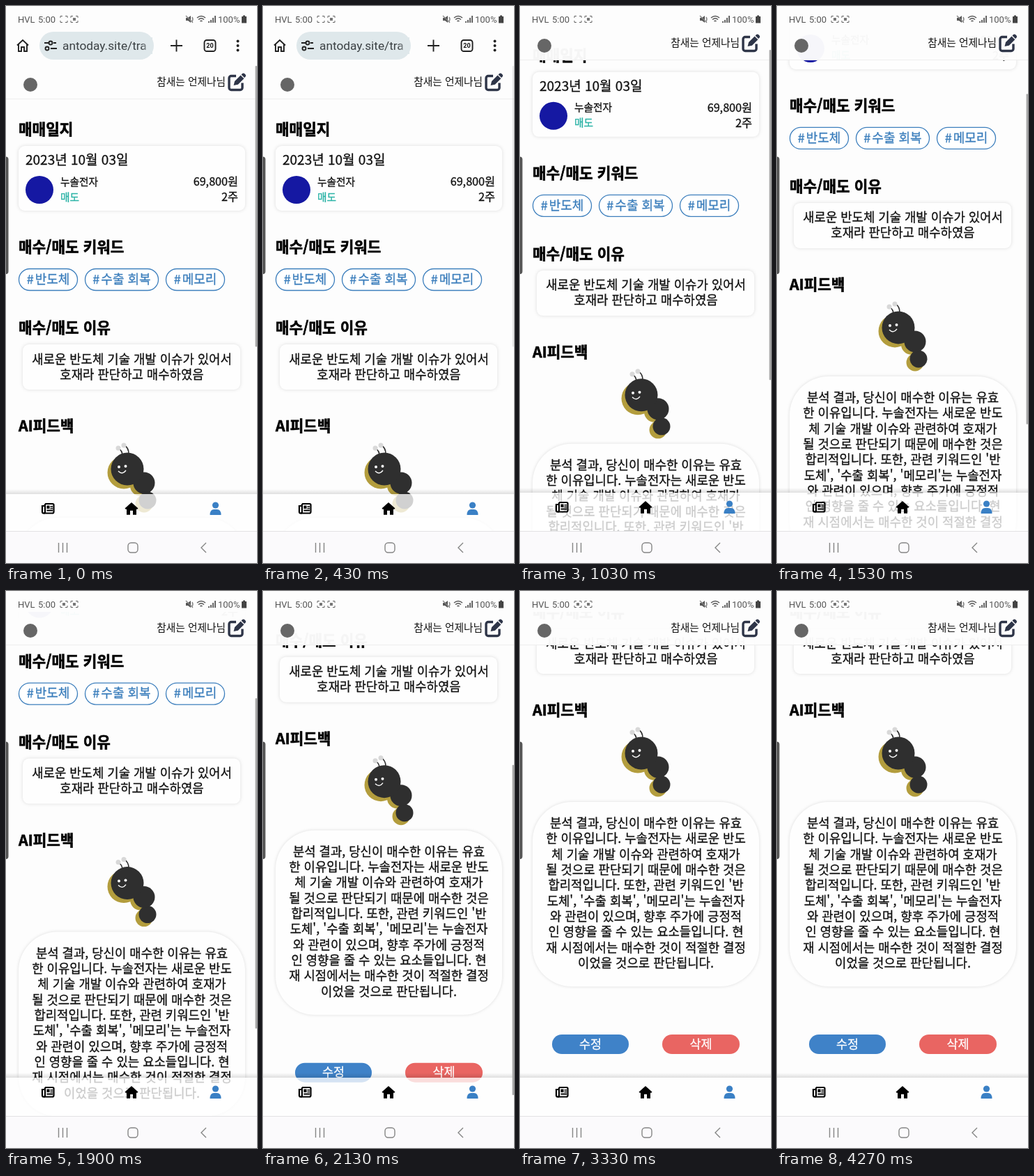
An HTML page that plays this animation: 360 by 800 pixels, repeating every 4310 ms.

```html
<!DOCTYPE html>
<html lang="ko">
<head>
<meta charset="utf-8">
<style>
  html, body { margin: 0; width: 100%; height: 100%; overflow: hidden; background: #fdfdfd; }
  svg { display: block; width: 360px; height: 800px; }
  text { font: 500 17.8px "Noto Sans CJK KR", "Noto Sans CJK", sans-serif; fill: #111; }
  #page text { stroke: #111; stroke-width: .3; }
  .mid { text-anchor: middle; }
  .end { text-anchor: end; }
  #page .title { font-size: 21.3px; font-weight: 900; fill: #000; stroke: #000; stroke-width: .6; }
  .date { font-size: 19px; }
  .small { font-size: 14.7px; }
  .price { font-size: 16.2px; }
  #page .sell { fill: #2bb3a6; stroke: #2bb3a6; }
  #page .chip text { font-size: 18px; fill: #3d7fbd; stroke: #3d7fbd; }
  .chip rect { fill: #fff; stroke: #3d7fbd; stroke-width: 1.3; }
  .card { fill: #fefefe; filter: drop-shadow(0 0 2.5px #0002); }
  .soft { filter: drop-shadow(0 0 2px #0002); }
  #page .button { font-size: 17.4px; fill: #fff; stroke: #fff; }
  .roboto, .status text { font-family: Roboto, sans-serif; font-weight: 400; }
  .status text { font-size: 13px; fill: #555; }
  .line { fill: none; stroke: #222; stroke-width: 1.9; }
  .gray { fill: none; stroke: #858585; stroke-width: 1.4; }
</style>
</head>
<body>
<svg viewBox="0 0 360 800">
  <defs>
    <linearGradient id="shade" x2="0" y2="1">
      <stop stop-opacity="0"/><stop offset="1" stop-opacity=".12"/>
    </linearGradient>
    <linearGradient id="fade">
      <stop offset=".6" stop-color="#dfe8eb" stop-opacity="0"/><stop offset="1" stop-color="#dfe8eb"/>
    </linearGradient>
    <path id="corners" d="M0 3V.5H3M7 .5h3V3M10 7v2.5H7M3 9.5H0V7" fill="none" stroke="#666"/>
  </defs>
  <rect width="360" height="800" fill="#fdfdfd"/>

  <g id="web">
    <g id="page">
      <g id="titles"></g>
      <rect class="card" x="18" y="201" width="325" height="93" rx="9"/>
      <text class="date" x="28" y="228">2023년 10월 03일</text>
      <circle cx="48" cy="264" r="20" fill="#1518a2"/>
      <text class="small" x="78" y="257.5">누솔전자</text>
      <text class="small sell" x="78" y="279.5">매도</text>
      <text class="price end" x="333" y="258">69,800원</text>
      <text class="price end" x="333" y="280">2주</text>
      <g id="chips" class="chip"></g>
      <rect class="card" x="24" y="486" width="312" height="65" rx="9"/>
      <text class="mid" x="180.5" y="513.5">새로운 반도체 기술 개발 이슈가 있어서</text>
      <text class="mid" x="180.5" y="535.5">호재라 판단하고 매수하였음</text>

      <g fill="#b39d3d">
        <circle cx="169" cy="670" r="23.5"/><circle cx="193" cy="689" r="15"/><circle cx="198" cy="715" r="12.5"/>
      </g>
      <g fill="#2f2f2f">
        <circle cx="203" cy="710" r="12.5"/><circle cx="198" cy="685" r="15.5"/><circle cx="174" cy="665" r="23.5"/>
      </g>
      <path d="M167 646q0-7-5-10M176 643q0-8-6-12" fill="none" stroke="#2f2f2f" stroke-width="1.6"/>
      <g fill="#d8d8d8"><circle cx="161" cy="635" r="3.5"/><circle cx="169" cy="631" r="3.5"/></g>
      <g fill="#fff"><circle cx="162" cy="662" r="2"/><circle cx="171.5" cy="661" r="2"/></g>
      <path d="M161 668q6 6 11-1" fill="none" stroke="#fff" stroke-width="1.4"/>

      <rect class="card soft" x="18" y="735" width="325" height="265" rx="56"/>
      <g id="feedback"></g>
      <rect x="46" y="1069" width="110" height="28" rx="14" fill="#3f82c8"/>
      <rect x="204" y="1069" width="111" height="28" rx="14" fill="#e96562"/>
      <text class="mid button" x="101" y="1088.7">수정</text>
      <text class="mid button" x="259.5" y="1088.7">삭제</text>
    </g>

    <g id="top">
      <rect y="86" width="360" height="47" fill="#fdfdfd" fill-opacity=".97"/>
      <path d="M0 133.5H360" stroke="#eee"/>
      <circle cx="35" cy="113" r="10" fill="#666"/>
      <text class="small end" x="315" y="113.5" fill="#343842">참새는 언제나님</text>
      <g fill="#2e3548">
        <path d="M330 100.5h-7a3 3 0 0 0-3 3v14a3 3 0 0 0 3 3h13a3 3 0 0 0 3-3v-7" fill="none" stroke="#2e3548" stroke-width="3.4"/>
        <path d="M326.5 114l1.5-6 8.5-8.5 4.8 4.8-8.5 8.5zM337.5 98.5l1.5-1.5q1.5-1.2 3 0l1.5 1.5q1.3 1.5 0 3l-1.5 1.6z"/>
      </g>
      <rect y="30" width="360" height="56" fill="#fdfdfd"/>
      <path class="line" d="M16 56.5l8-7.5 8 7.5M18 55v10h4v-6h4v6h4V55"/>
      <rect x="48" y="37" width="164" height="40" rx="20" fill="#dfe8eb"/>
      <path class="line" d="M61 53h-6M64 61h9M72 53h-4"/>
      <g class="line"><circle cx="64" cy="53" r="2.5"/><circle cx="59" cy="61" r="2.5"/></g>
      <text class="roboto" x="81" y="63" style="font-size:17.3px;fill:#3c4245">antoday.site/tra</text>
      <rect x="170" y="45" width="40" height="24" fill="url(#fade)"/>
      <path class="line" d="M236 57h17M244.5 48.5v17"/>
      <rect class="line" x="284.5" y="49" width="16" height="16" rx="3.5"/>
      <text class="roboto mid" x="292.5" y="60.3" style="font-size:9px;font-weight:700">20</text>
      <g fill="#222"><circle cx="332.5" cy="50.5" r="2"/><circle cx="332.5" cy="57" r="2"/><circle cx="332.5" cy="63.5" r="2"/></g>
    </g>

    <g id="nav">
      <rect y="692" width="360" height="7" fill="url(#shade)"/>
      <rect y="699" width="360" height="60" fill="#fff" fill-opacity=".78"/>
      <path d="M56 713h11q1.500 0 1.500 1.500v10q0 2-2 2H54q-2 0-2-2V716h3.500" fill="none" stroke="#000" stroke-width="2.2"/>
      <path d="M56 713v11.500q0 2-2 2" fill="none" stroke="#000" stroke-width="2.200"/>
      <path d="M58.500 715.500h4v4.500h-4zM63.500 716h3.500v1.600h-3.500zM63.500 718.700h3.500v1.600h-3.500zM58.500 721.600h8.500v1.800h-8.500z"/>
      <path d="M180 711l9.500 8.500-1.200 1.300H187v8h-5v-6h-4v6h-5v-8h-1.300l-1.200-1.300z"/>
      <g fill="#3a80c5"><circle cx="300.500" cy="715" r="4.600"/><path d="M292.500 729q0-8 6-8h4q6 0 6 8z"/></g>
    </g>
    <rect id="thumb" x="357.5" width="2.5" rx="1" fill="#a9a9a9"/>
  </g>

  <rect width="360" height="29.5" fill="#fdfdfd"/>
  <g class="status">
    <text x="17" y="23.5">HVL</text>
    <text x="46" y="23.5">5:00</text>
    <use href="#corners" x="78" y="14"/>
    <use href="#corners" x="93" y="14"/>
    <rect id="mark" x="81" y="17" width="4" height="4" fill="#777"/>
    <rect x="96" y="17" width="4" height="4" fill="#777"/>
    <path d="M258 17h3l4-3v10l-4-3h-3z" fill="#555"/>
    <path d="M258 14l10 10M267 16q2 3 0 6" class="gray"/>
    <path d="M274 17q6-5 12 0M276 19.5q4-3.5 8 0M278.5 22q1.5-1.5 3 0" fill="none" stroke="#555" stroke-width="1.5"/>
    <path d="M291 24v-2M294 24v-4M297 24v-7M300 24V14" stroke="#555" stroke-width="1.8"/>
    <text x="304" y="23.5">100%</text>
    <path d="M338 15h2v-1.5h3V15h2v9.5h-7z" fill="#444"/>
  </g>

  <rect y="754" width="360" height="46" fill="#fbfafc"/>
  <path d="M0 754.5H360" stroke="#e2e2e4"/>
  <path class="gray" d="M75.5 771v14M81.5 771v14M87.5 771v14M287 771l-7 7 7 7"/>
  <rect class="gray" x="175" y="771" width="14" height="14" rx="4.5"/>
  <path d="M0 216.5q3.5 0 3.5 4V381q0 4-3.5 4z" fill="#555"/>
</svg>

<script>
const LOOP = 4310, BAR = 56, BOTTOM = 754, PAGE = 1099, END = 432;
const $ = id => document.getElementById(id);

$('titles').innerHTML = [['매매일지', 185], ['매수/매도 키워드', 354], ['매수/매도 이유', 470], ['AI피드백', 611]]
  .map(([s, y]) => `<text class="title" x="18" y="${y}">${s}</text>`).join('');

$('chips').innerHTML = [['반도체', 18, 85], ['수출 회복', 113, 106], ['메모리', 229, 85]]
  .map(([s, x, w]) => `<rect x="${x + .5}" y="377.5" width="${w - 1}" height="31" rx="15.5"/>
    <text class="mid" x="${x + w / 2}" y="398.8">#<tspan dx="2">${s}</tspan></text>`).join('');

$('feedback').innerHTML = `분석 결과, 당신이 매수한 이유는 유효
한 이유입니다. 누솔전자는 새로운 반도
체 기술 개발 이슈와 관련하여 호재가
될 것으로 판단되기 때문에 매수한 것은
합리적입니다. 또한, 관련 키워드인 '반
도체', '수출 회복', '메모리'는 누솔전자
와 관련이 있으며, 향후 주가에 긍정적
인 영향을 줄 수 있는 요소들입니다. 현
재 시점에서는 매수한 것이 적절한 결정
이었을 것으로 판단됩니다.`.split('\n')
  .map((s, i) => `<text class="mid" x="180.5" y="${772 + i * 22.35}">${s}</text>`).join('');

// Finger travel: [time, distance], joined by a monotone cubic
const path = [[480, 0], [570, 13], [730, 48.5], [1030, 106], [1530, 203], [1600, 207],
  [1800, 207], [1890, 240], [2130, 391], [2280, 426], [2360, END]];
const rate = i => path[i] && path[i + 1] ? (path[i + 1][1] - path[i][1]) / (path[i + 1][0] - path[i][0]) : 0;
const slope = i => {
  const a = rate(i - 1), b = rate(i);
  return a * b > 0 ? 2 * a * b / (a + b) : 0;
};
const clamp = x => Math.max(0, Math.min(1, x));

function travel(t) {
  if (t <= path[0][0]) return 0;
  const i = path.findIndex((p, k) => k < path.length - 1 && t < path[k + 1][0]);
  if (i < 0) return END;
  const [t0, a] = path[i], [t1, b] = path[i + 1], d = t1 - t0, u = (t - t0) / d, v = 1 - u;
  return a * v * v * (1 + 2 * u) + b * u * u * (3 - 2 * u)
    + d * u * v * (v * slope(i) - u * slope(i + 1));
}

function draw(now) {
  const t = now % LOOP, s = travel(t), hidden = Math.min(s, BAR);
  const top = 86 - hidden, view = BOTTOM - top;
  // Overscroll stretches the page from its lower edge
  const pull = 3.1 * Math.sin(Math.PI * clamp((t - 2360) / 500));
  const k = 1 + pull / 677;
  $('web').setAttribute('transform', `matrix(1 0 0 ${k} 0 ${BOTTOM * (1 - k)})`);
  $('page').setAttribute('transform', `translate(0 ${-s})`);
  $('top').setAttribute('transform', `translate(0 ${-hidden})`);
  $('nav').setAttribute('transform', `translate(0 ${2 * (1 - hidden / BAR)})`);
  $('thumb').setAttribute('y', top + (s - hidden) * (view - 4) / PAGE);
  $('thumb').setAttribute('height', view * (view - 4) / PAGE);
  $('thumb').setAttribute('opacity', s > BAR ? clamp((2830 - t) / 150) : clamp((480 - t) / 200));
  $('mark').setAttribute('opacity', t > 1200 ? 1 : 0);
}

function tick() {
  draw(performance.now());
  requestAnimationFrame(tick);
}
tick();
</script>
</body>
</html>
```
